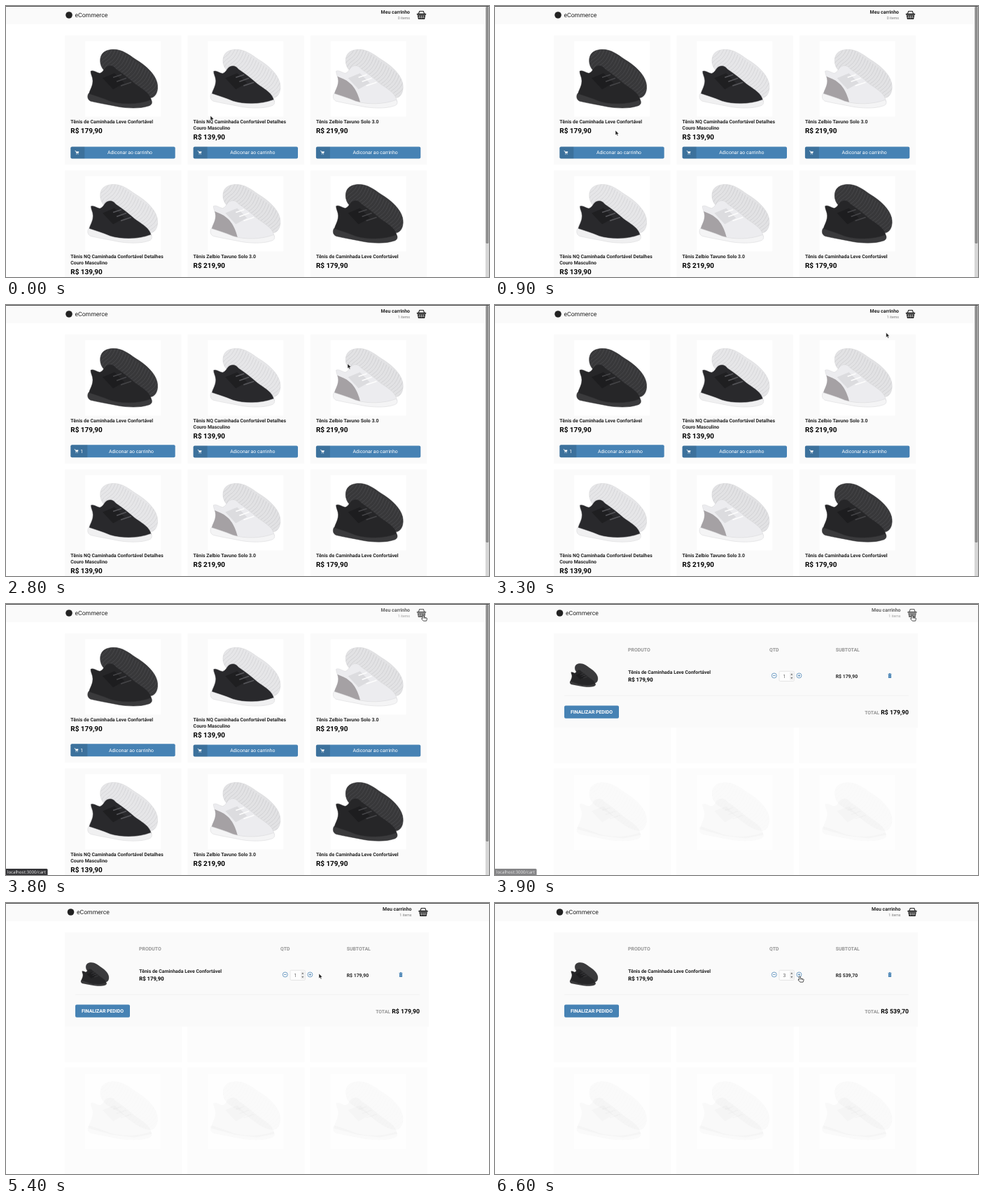
An HTML page with a canvas for the animation above (8 s loop, 690 px wide and 388 px high).

```html
<!DOCTYPE html>
<html lang="pt-BR">
<head>
<meta charset="utf-8">
<title>Loja</title>
<style>
html, body { margin: 0; width: 100%; height: 100%; overflow: hidden; background: #fff; }
canvas { display: block; width: 690px; height: 388px; }
</style>
</head>
<body>
<canvas id="stage"></canvas>
<script>
const W = 690, H = 388, LOOP = 8000, STEP = 100;
const BLUE = '#4682b4', BLUE_HOVER = '#417aa8', PANEL = '#fafafa', INK = '#222';
const canvas = document.getElementById('stage');
const dpr = window.devicePixelRatio || 1;
canvas.width = W * dpr;
canvas.height = H * dpr;
const c = canvas.getContext('2d');

// Times of the user's actions
const ADD = 1600, OPEN_CART = 3900, PLUS = [5900, 6500];

// Pointer stops: time, x, y
const PATH = [
  [100, 292, 157], [900, 172, 178], [1200, 171.5, 206], [1950, 171.5, 206],
  [2800, 488, 84], [2850, 488, 84], [3600, 596, 16], [4650, 596, 16],
  [5400, 447, 101], [5550, 435.5, 105]
];

const PRODUCTS = [
  { title: ['Tênis de Caminhada Leve Confortável'], price: 179.9,
    look: { back: '#38383a', groove: '#4f4f52', upper: '#262628', sole: '#3a3a3c', lace: '#454548', edge: '#2a2a2c', band: '#1d1d1f' } },
  { title: ['Tênis NQ Caminhada Confortável Detalhes', 'Couro Masculino'], price: 139.9,
    look: { back: '#e6e6e8', groove: '#cfcfd2', upper: '#29292c', sole: '#f0f0f1', lace: '#56565a', edge: '#d4d4d7', band: '#1f1f21' } },
  { title: ['Tênis Zelbio Tavuno Solo 3.0'], price: 219.9,
    look: { back: '#e2e2e4', groove: '#c9c9cc', upper: '#ececef', sole: '#f4f4f5', lace: '#fdfdfd', edge: '#d4d4d7', band: '#dcdcdf', heel: '#a5a1a4' } }
];

const money = v => 'R$ ' + v.toFixed(2).replace('.', ',');
const clamp = v => Math.max(0, Math.min(1, v));
const ramp = (t, from, len) => clamp((t - from) / len);

function rect(x, y, w, h, fill) {
  c.fillStyle = fill;
  c.fillRect(x, y, w, h);
}

function rounded(x, y, w, h, r, fill) {
  c.beginPath();
  c.roundRect(x, y, w, h, r);
  c.fillStyle = fill;
  c.fill();
}

function disc(x, y, r, fill) {
  c.beginPath();
  c.arc(x, y, r, 0, Math.PI * 2);
  c.fillStyle = fill;
  c.fill();
}

function text(str, x, y, size, { bold = false, fill = INK, align = 'left', family = 'Roboto' } = {}) {
  c.font = `${bold ? 700 : 400} ${size}px ${family}, sans-serif`;
  c.textAlign = align;
  c.fillStyle = fill;
  c.fillText(str, x, y);
}

function shape(d, fill, line, width = 0.5) {
  const p = new Path2D(d);
  if (fill) {
    c.fillStyle = fill;
    c.fill(p);
  }
  if (line) {
    c.strokeStyle = line;
    c.lineWidth = width;
    c.stroke(p);
  }
  return p;
}

function at(x, y, k, draw) {
  c.save();
  c.translate(x, y);
  c.scale(k, k);
  draw();
  c.restore();
}

// Pair of shoes inside a 108 x 108 picture
function shoes(x, y, look, k = 1) {
  at(x, y, k, () => {
    const back = shape('M22 32C20 18 28 12 41 12C53 12 62 19 72 26C87 35 100 47 103 60C105 70 102 79 95 81C82 82 66 70 50 56C34 48 24 43 22 32Z', look.back, look.edge);
    c.save();
    c.clip(back);
    c.strokeStyle = look.groove;
    c.lineWidth = 0.7;
    c.beginPath();
    for (let i = 0; i < 26; i++) {
      const gx = 15 + i * 3.6, gy = 36 + i * 2.6;
      c.moveTo(gx, gy);
      c.bezierCurveTo(gx + 6, gy - 18, gx + 14, gy - 8, gx + 22, gy - 32);
    }
    c.stroke();
    c.restore();

    const upper = shape('M8 43C12 41 16 45 21 46C26 45 27 38 32 36C37 34 41 36 44 40C53 46 62 53 71 61C82 69 94 75 95 87L70 92L38 88L5 79C5 72 11 66 11 57C11 51 8 48 8 43Z', look.upper, look.edge);
    if (look.heel) {
      c.save();
      c.clip(upper);
      shape('M4 48L18 54C29 59 38 68 43 90L3 84Z', look.heel);
      c.restore();
    }
    shape('M25 53L42 46L56 60L40 69Z', look.band);
    shape('M40 52L52 48M45 58L59 53M51 64L66 59', null, look.lace, 1.5);
    shape('M5 75C14 78 24 81 36 86C52 91 76 91 94 84C97 88 95 92 90 93C78 97 60 96 48 94C34 91 20 89 8 86C3 84 3 78 5 75Z', look.sole, look.edge);
  });
}

function cartIcon(x, y) {
  shape(`M${x} ${y}h1.1l1 3.4h2.7l.7-2.3h-3.9z`, '#fff', '#fff', 0.35);
  disc(x + 2.2, y + 4.6, 0.55, '#fff');
  disc(x + 4.5, y + 4.6, 0.55, '#fff');
}

function basket(x, y) {
  at(x, y, 1, () => {
    shape('M2.4 5L3.9 .9H9.5L11 5', null, INK, 1.1);
    rounded(0, 4.2, 13.4, 1.9, 0.8, INK);
    shape('M.9 6.6H12.5L11.3 12.4H2.1Z', INK);
    shape('M3.9 7.2L4.3 11.5M6.7 7.2V11.5M9.5 7.2L9.1 11.5M2 9.3H11.4', null, PANEL, 0.55);
  });
}

function header(dx, items, opacity) {
  rect(0, 0, W, 26, PANEL);
  rect(0, 0, W, 1, '#4c4c4c');
  disc(90 + dx, 13, 4.8, INK);
  text('eCommerce', 98.5 + dx, 16, 8.65);
  c.globalAlpha = opacity;
  text('Meu carrinho', 577 + dx, 11.4, 6.95, { bold: true, align: 'right' });
  text(items + ' items', 577 + dx, 19.4, 5.25, { fill: '#777', align: 'right' });
  basket(586.8 + dx, 6.6);
  c.globalAlpha = 1;
}

function addButton(x, y, count, hover) {
  const side = count ? 24 : 20, h = count ? 18 : 17;
  rounded(x, y, 149.4, h, 2, hover ? BLUE_HOVER : BLUE);
  rounded(x, y, side, h, [2, 0, 0, 2], 'rgba(0,0,0,.13)');
  const mid = y + h / 2;
  cartIcon(x + (count ? 5.4 : 6.2), mid - 2.6);
  if (count) text(count, x + 13.9, mid + 2.5, 6.93, { fill: '#fff' });
  text('Adiconar ao carrinho', x + (side + 149.4) / 2, mid + 2.4, 6.93, { fill: '#fff', align: 'center' });
}

const columnX = i => 84.2 + i * 175.3;
const rowY = r => 42.3 + r * 193.2;

function card(i, row, product, count, hover) {
  const x = columnX(i), y = rowY(row), tx = x + 8.1;
  rect(x, y, 166.2, 185, PANEL);
  rect(x + 28.8, y + 8, 108, 108, '#fff');
  shoes(x + 28.8, y + 8, product.look);
  product.title.forEach((line, n) => text(line, tx, y + 125.9 + n * 8.8, 6.93, { bold: true }));
  const shift = (product.title.length - 1) * 8.8;
  text(money(product.price), tx, y + 139.5 + shift, 9.95, { bold: true, fill: '#000' });
  addButton(tx, y + (count ? 158 : 159.2), count, hover);
}

function shop(count, pos, linkOpacity) {
  for (let row = 0; row < 2; row++) {
    for (let i = 0; i < 3; i++) {
      const first = row + i === 0;
      card(i, row, PRODUCTS[(i + row) % 3], first ? count : 0, first && overAdd(pos));
    }
  }
  header(0, count, linkOpacity);
  rect(685, 1, 5, H, '#d6d6d6');
  rounded(685.5, 1, 4, 339, 1.5, '#8e8e8e');
}

// Faint remains of the shop under the cart page
function remains() {
  for (let row = 0; row < 2; row++) {
    for (let i = 0; i < 3; i++) {
      const x = columnX(i), y = rowY(row);
      rect(x - 0.3, y, 167.5, 185.5, '#fcfcfc');
      if (!row) continue;
      rect(x + 28.8, y + 9, 108, 108, '#fefefe');
      c.globalAlpha = 0.018;
      shoes(x + 28.8, y + 8, PRODUCTS[0].look);
      c.globalAlpha = 1;
    }
  }
}

function roundButton(x, y, plus) {
  c.beginPath();
  c.arc(x, y, 3.5, 0, Math.PI * 2);
  c.strokeStyle = BLUE;
  c.lineWidth = 0.75;
  c.stroke();
  shape(`M${x - 1.8} ${y}h3.6` + (plus ? `M${x} ${y - 1.8}v3.6` : ''), null, BLUE, 0.75);
}

function quantity(n) {
  roundButton(398.8, 102.5, false);
  roundButton(434.4, 102.5, true);
  c.beginPath();
  c.roundRect(406, 96.3, 21.4, 14.2, 1.5);
  c.fillStyle = '#fdfdfd';
  c.fill();
  c.strokeStyle = '#ddd';
  c.lineWidth = 0.7;
  c.stroke();
  text(n, 413.4, 106, 6.95, { fill: '#666', align: 'center' });
  rect(421.2, 98, 5.2, 10.8, '#ececec');
  shape('M422.3 101.6L423.8 99.8L425.3 101.6ZM422.3 105.2L423.8 107L425.3 105.2Z', '#555');
}

function trash(x, y) {
  rect(x, y + 0.8, 5, 0.9, BLUE);
  rect(x + 1.5, y, 2, 0.9, BLUE);
  rounded(x + 0.4, y + 2.1, 4.2, 5, 0.6, BLUE);
  shape(`M${x + 1.7} ${y + 3}v3.2M${x + 3.3} ${y + 3}v3.2`, null, '#a9c5dc', 0.45);
}

function cart(n, linkOpacity) {
  const { title, price, look } = PRODUCTS[0];
  const head = { bold: true, fill: '#949494' };
  remains();
  header(2.5, 1, linkOpacity);
  rect(84, 42, 520, 135, PANEL);
  text('PRODUTO', 190, 68.2, 6.95, head);
  text('QTD', 392, 68.2, 6.95, head);
  text('SUBTOTAL', 486.7, 68.2, 6.95, head);
  shoes(105.5, 80.5, look, 0.4);
  text(title[0], 190.2, 100.3, 6.93, { bold: true });
  text(money(price), 190.2, 111.2, 7.75, { bold: true, fill: '#000' });
  quantity(n);
  text(money(price * n), 486.7, 106.1, 6.87, { bold: true });
  trash(561.5, 99);
  rect(99, 130.8, 492, 0.6, '#ececec');
  rounded(99, 145.5, 78, 18.2, 2, BLUE);
  text('FINALIZAR PEDIDO', 138, 157.1, 6.9, { bold: true, fill: '#fff', align: 'center' });
  text('TOTAL', 528.2, 158, 6.87, head);
  text(money(price * n), 591, 158, 8.7, { bold: true, fill: '#000', align: 'right' });
}

function statusBar(t) {
  const strength = t < OPEN_CART ? ramp(t, 3400, 200) : 0.6 * (1 - ramp(t, 4700, 200));
  if (!strength) return;
  c.globalAlpha = strength;
  rounded(-1, 379, 60.5, 10, [0, 1.5, 0, 0], '#353538');
  c.globalAlpha = Math.min(1, strength * 1.5);
  text('localhost:3000/cart', 1.8, 386, 6.15, { fill: '#f0f0f0', family: '"Noto Sans"' });
  c.globalAlpha = 1;
}

function pointerAt(t) {
  const next = PATH.findIndex(p => p[0] > t);
  if (next === 0) return PATH[0].slice(1);
  if (next < 0) return PATH[PATH.length - 1].slice(1);
  const [t0, x0, y0] = PATH[next - 1], [t1, x1, y1] = PATH[next];
  const e = (1 - Math.cos(Math.PI * (t - t0) / (t1 - t0))) / 2;
  return [x0 + (x1 - x0) * e, y0 + (y1 - y0) * e];
}

const inside = ([x, y], l, t, r, b) => x >= l && x <= r && y >= t && y <= b;
const overAdd = pos => inside(pos, 92, 200, 242, 219);
const overLink = pos => inside(pos, 533, 4, 604, 22);
const overPlus = pos => inside(pos, 430, 98, 439, 107);

function pointer(pos, hand) {
  at(pos[0], pos[1], 1, () => {
    c.lineJoin = 'round';
    if (hand) {
      shape('M-1 .5Q0-.6 1 .5V3L5 4Q5.8 4.3 5.5 5.5L4.6 8.2H.3L-2.6 5Q-2.4 4-1 4.9Z', '#fff', '#222', 0.8);
      shape('M1 3.2V5M2.6 3.6V5.2M4 4V5.4', null, '#222', 0.5);
    } else {
      shape('M0 0V7L1.6 5.6L2.7 8L3.9 7.5L2.9 5.1H5Z', '#222', '#fff', 0.5);
    }
  });
}

function draw(t) {
  const pos = pointerAt(t);
  const inCart = t >= OPEN_CART;
  const linkOpacity = 1 - 0.3 * (ramp(t, 3450, 200) - ramp(t, 4750, 200));
  c.setTransform(dpr, 0, 0, dpr, 0, 0);
  c.textRendering = 'geometricPrecision';
  rect(0, 0, W, H, '#fff');
  if (inCart) cart(1 + PLUS.filter(p => t >= p).length, linkOpacity);
  else shop(t >= ADD ? 1 : 0, pos, linkOpacity);
  statusBar(t);
  pointer(pos, overLink(pos) || (inCart ? overPlus(pos) : overAdd(pos)));
}

const start = performance.now();
function tick() {
  const t = (performance.now() - start) % LOOP;
  draw(Math.floor(t / STEP) * STEP);
  requestAnimationFrame(tick);
}
tick();
</script>
</body>
</html>
```
